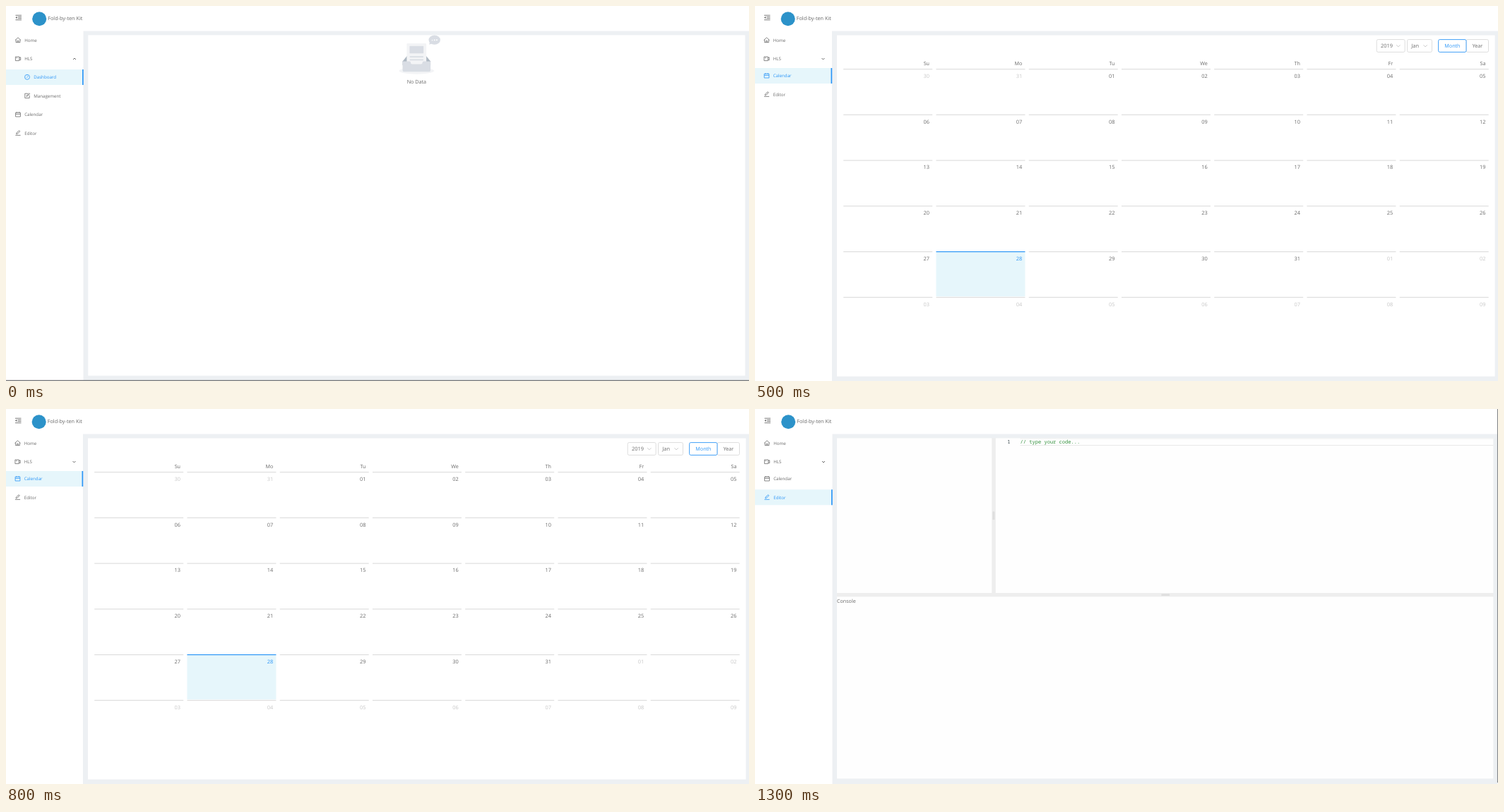
An HTML page for the animation above (1500 ms loop, 1052 px wide and 532 px high).

```html
<!DOCTYPE html>
<html lang="en">
<head>
<meta charset="utf-8">
<title>Dashboard tour</title>
<style>
  html, body { margin: 0; width: 100%; height: 100%; overflow: hidden; background: #fff; }
  svg { display: block; width: 100vw; height: 100vh; }
  text { font-family: "Open Sans", "Noto Sans", sans-serif; text-rendering: geometricPrecision; }
  .code { font-family: "Noto Sans Mono", "DejaVu Sans Mono", monospace; }
</style>
</head>
<body>
<svg id="stage" viewBox="0 0 1052 532"></svg>
<script>
const BLUE = '#2d96f7', TINT = '#e6f6fb', INK = '#6a6a6a', PALE = '#c6c6c6', GUTTER = '#edf0f3';
const SCENE_MS = 500;

const rect = (x, y, w, h, fill, extra = '') =>
  `<rect x="${x}" y="${y}" width="${w}" height="${h}" fill="${fill}" ${extra}/>`;
const path = (d, color, width = 0.8) =>
  `<path d="${d}" fill="none" stroke="${color}" stroke-width="${width}"/>`;
const shape = (d, fill) => `<path d="${d}" fill="${fill}"/>`;
const text = (x, y, str, size = 7.2, fill = INK, extra = '') =>
  `<text x="${x}" y="${y}" font-size="${size}" fill="${fill}" ${extra}>${str}</text>`;
const group = (x, y, body, scale = 1) =>
  `<g transform="translate(${x} ${y}) scale(${scale})">${body}</g>`;

// Outline icons centred on the origin
const icons = {
  home: 'M-4 .2L0-3.5 4 .2M-2.9-.6V3.4H2.9V-.6M-.9 3.4V1H.9V3.4',
  video: 'M-3.6-2.8H1.8V2.8H-3.6ZM1.8-1.2L3.7-2V2L1.8 1.2M-2.4-1.2H-.9',
  gauge: 'M3.5 0A3.5 3.5 0 1 1-3.5 0A3.5 3.5 0 1 1 3.5 0M-.3.7L1.5-1.3M-2.2.3H-1.6M0-2.3V-1.7',
  form: 'M1-3.1H-3.2V3.3H3.2V-.6M-1 1L-.8-.2 2.9-3.6 3.6-2.9 0 .8Z',
  calendar: 'M-3.4-2.6H3.4V3.2H-3.4ZM-3.4-.4H3.4M-1.6-3.6V-1.8M1.6-3.6V-1.8',
  edit: 'M-3.6 3.3H3.6M-2.4 1.6L-2-.2 1.7-3.4 2.8-2.2-.8 1.2Z'
};

function menuItem({ icon, label, y, sub, active }, chevron) {
  const color = active ? BLUE : INK, x = sub ? 30 : 17;
  return (active ? rect(0, y - 11, 109.5, 22, TINT) + rect(108, y - 11, 1.7, 22, BLUE) : '') +
    group(x, y - 0.2, path(icons[icon], color)) +
    text(x + 9.2, y + 2.4, label, 6.2, color) +
    (chevron ? path(`M95 ${y + chevron}l2 ${-2 * chevron} 2 ${2 * chevron}`, INK, 1) : '');
}

function shell(active, open) {
  const rows = open
    ? [['home', 'Home', 48.5], ['video', 'HLS', 75], ['gauge', 'Dashboard', 101, 1],
       ['form', 'Management', 127.5, 1], ['calendar', 'Calendar', 154], ['edit', 'Editor', 180.3]]
    : [['home', 'Home', 48.5], ['video', 'HLS', 75], ['calendar', 'Calendar', 99], ['edit', 'Editor', 125.3]];
  const items = rows.map(([icon, label, y, sub]) =>
    menuItem({ icon, label, y, sub, active: label === active }, label === 'HLS' && (open ? 1 : -1)));
  return path('M13.5 13.2H22M17 15.4H22M17 17.5H22M13.5 19.7H22', INK, 0.9) +
    shape('M13.4 16.4L15.8 14.8V18Z', INK) +
    '<circle cx="47.2" cy="18.3" r="10" fill="#2c92c9"/>' +
    text(59.2, 20.3, 'Fold-by-ten Kit', 7.3) + items.join('');
}

function emptyBox() {
  const tray = 'M13.6 69.7H39.9C42.8 69.7 45.1 72.1 45.1 75.1S47.5 80.5 50.4 80.5H85.2' +
    'C88.1 80.5 90.5 78.1 90.5 75.1S92.8 69.7 95.7 69.7H122V103.2Q122 110.4 115 110.4H20.5Q13.6 110.4 13.6 103.2Z';
  const box = '<ellipse cx="67.8" cy="106.9" rx="67.8" ry="12.7" fill="#f3f4f6"/>' +
    shape('M122 69.7L98.1 40.2Q96 38 93.5 38H42Q39.5 38 37.5 40.2L13.6 69.7V85H122Z', '#aeb8c2') +
    rect(29.8, 0, 76, 101.3, '#f3f4f6', 'rx="4"') +
    rect(40.7, 10, 54.2, 29, '#d9dde4', 'rx="2"') +
    rect(40.7, 49.8, 54.2, 4.5, '#d9dde4', 'rx="2.2"') +
    rect(40.7, 61.5, 54.2, 4.5, '#d9dde4', 'rx="2.2"') + shape(tray, '#d9dde4');
  const bubble = '<ellipse cx="161.4" cy="18.1" rx="22.6" ry="18.1" fill="#d9dde4"/>' +
    shape('M143 27L140.8 36.3 152 32Z', '#d9dde4') +
    '<circle cx="170.3" cy="18.5" r="2.8" fill="#fff"/>' +
    shape('M155.3 21H149.6L152.5 16.1ZM158.9 16.1H163.9V21H158.9Z', '#fff');
  return group(547.8, 41.5, group(24, 31.67, box) + bubble, 0.365);
}

function dashboard() {
  return rect(109.5, 35.5, 942.5, 496.5, GUTTER) + rect(116.3, 41.3, 930.2, 483.2, '#fff') +
    emptyBox() + text(581.4, 109.5, 'No Data', 7.2, INK, 'text-anchor="middle"') +
    rect(0, 530.7, 1052, 1.3, '#77797b') + shell('Dashboard', true);
}

function select(x, w, label) {
  return rect(x, 47.6, w, 17.8, '#fff', 'rx="2" stroke="#dadada" stroke-width=".9"') +
    text(x + 5.8, 59.3, label, 7.4) + path(`M${x + w - 12} 55.3l2.6 2.6 2.6-2.6`, '#bcbcbc', 0.8);
}

function calendar() {
  const colW = 131.25, rowH = 64.75, right = 'text-anchor="end"';
  let out = rect(109, 35.5, 943, 496.5, GUTTER) + rect(116, 41.5, 931.6, 484, '#fff') +
    select(880.2, 40, '2019') + select(923.5, 35, 'Jan') +
    rect(1007, 47.6, 31.5, 17.8, '#fff', 'rx="2" stroke="#dadada" stroke-width=".9"') +
    rect(967.6, 47.6, 39.4, 17.8, '#fff', `rx="2" stroke="${BLUE}" stroke-width=".9"`) +
    text(987.4, 59.2, 'Month', 7.2, BLUE, 'text-anchor="middle"') +
    text(1023, 59.2, 'Year', 7.2, INK, 'text-anchor="middle"');
  ['Su', 'Mo', 'Tu', 'We', 'Th', 'Fr', 'Sa'].forEach((name, c) => {
    out += text(247 + c * colW, 83.5, name, 7.2, INK, right);
  });
  for (let i = 0; i < 42; i++) {
    const x = 125.2 + (i % 7) * colW, y = 89.6 + Math.floor(i / 7) * rowH;
    const n = i - 1, inMonth = n > 0 && n < 32, today = n === 28;
    const day = inMonth ? n : n < 1 ? n + 31 : n - 31;
    if (today) out += rect(x, y, 126, 63.4, TINT);
    out += rect(x, y - 0.6, 126, 1.2, today ? BLUE : '#dedede') +
      text(x + 121.7, y + 12.2, String(day).padStart(2, '0'), 7.4, today ? BLUE : inMonth ? INK : PALE, right);
  }
  return out + group(-0.5, 0, shell('Calendar', false));
}

function editor() {
  const paper = '#fefefe';
  return rect(109.5, 35.5, 942.5, 496.5, GUTTER) + rect(116, 41.3, 929.3, 483, '#eee') +
    rect(116, 41.3, 219.3, 219.7, paper) + rect(340.8, 41.3, 704.5, 219.7, paper) +
    rect(116, 266.3, 929.3, 258, paper) +
    rect(336.4, 145.5, 3, 11.5, '#dedede') + rect(575.5, 262.3, 11.5, 2.8, '#dedede') +
    rect(375.5, 41.6, 669.8, 0.8, '#eaeaea') + rect(375.5, 51, 669.8, 1, '#e8e8e8') +
    text(361.6, 49.3, '1', 7.05, '#3c4a50', 'class="code" text-anchor="end"') +
    text(375.6, 49.3, '// type your code...', 7.05, '#2f8f3a', 'class="code"') +
    text(116, 275.2, 'Console', 7.15) +
    rect(1050.9, 0, 1.1, 530, '#85888b') + shell('Editor', false);
}

const stage = document.getElementById('stage');
stage.innerHTML = [dashboard, calendar, editor].map(draw => `<g>${draw()}</g>`).join('');
const scenes = [...stage.children];

function render(ms) {
  const current = Math.floor(ms / SCENE_MS) % scenes.length;
  scenes.forEach((scene, i) => scene.setAttribute('display', i === current ? 'inline' : 'none'));
}

const start = performance.now();
function tick() {
  render(performance.now() - start);
  requestAnimationFrame(tick);
}
tick();
</script>
</body>
</html>
```
